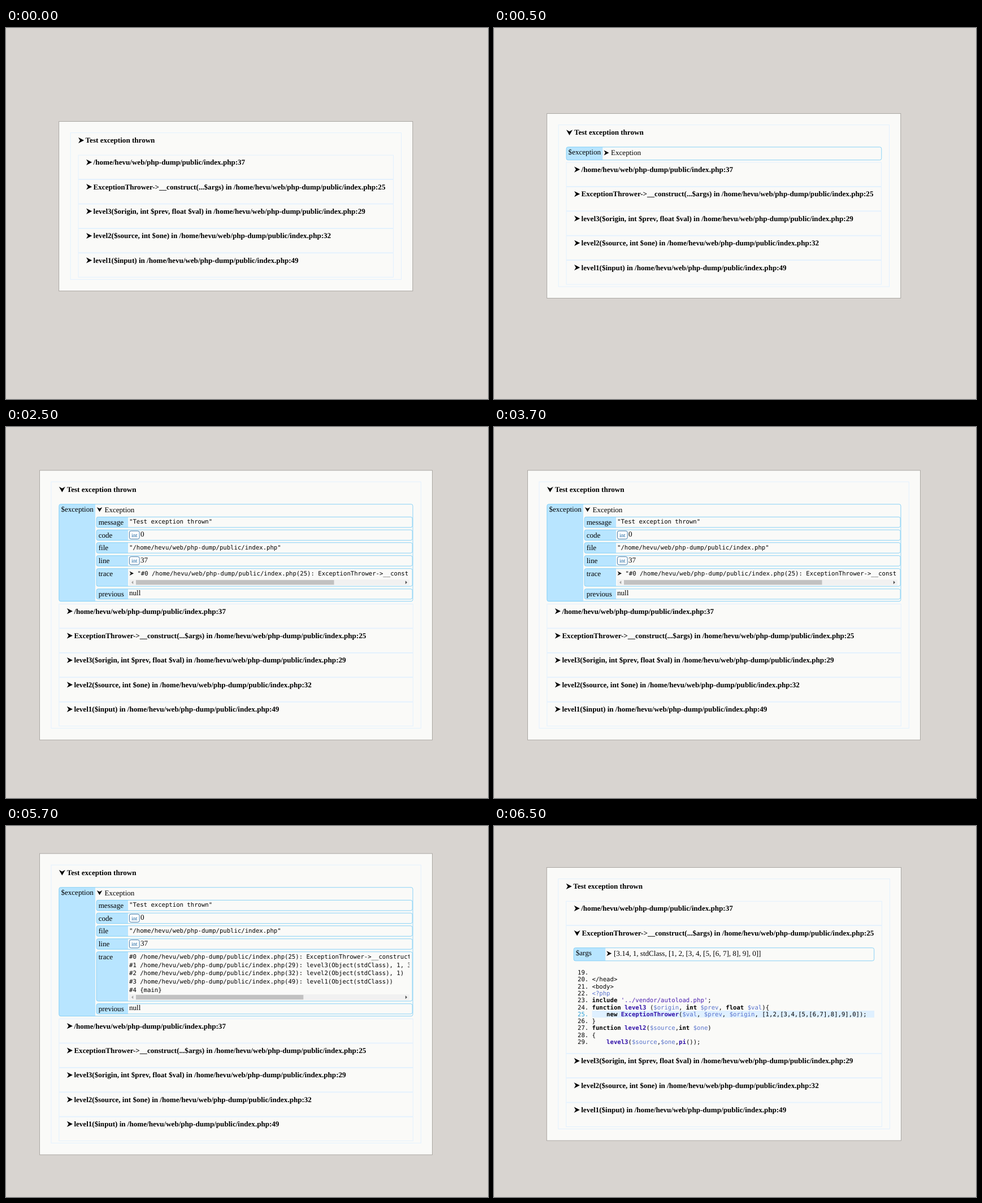
Animation of 853 by 657 pixels, one loop 8000 ms. Source, as an HTML page:

```html
<!DOCTYPE html>
<html lang="en">
<head>
<meta charset="utf-8">
<title>Exception dump</title>
<style>
  html, body { margin: 0; width: 100%; height: 100%; overflow: hidden; background: #d8d4d0; }
  svg { display: block; width: 853px; height: 657px; }
  text { white-space: pre; text-rendering: geometricPrecision; font: 13.09px "Liberation Serif", Times, serif; }
  .b { font-weight: bold; }
  .m { font: 10.636px "DejaVu Sans Mono", monospace; }
  .s { font-size: 9.82px; fill: #0b5a9a; }
  .k { font-weight: bold; }
  .f { font-weight: bold; fill: #3010a8; }
  .v { fill: #5872cc; }
  .q { fill: #4a1fb0; }
  .n { fill: #2a9fd6; }
</style>
</head>
<body>
<svg id="stage" viewBox="0 0 853 657"></svg>
<script>
const PALE = '#e0f0ff', SKY = '#7dcdf5', LABEL = '#b8e5ff', PAPER = '#fafaf8';
const PITCH = 43.4, LINE = 14.73, CODE_LINE = 12.28;
const PATH = '/home/hevu/web/php-dump/public/index.php';
const CALLS = [
  `${PATH}:37`,
  `ExceptionThrower->__construct(...$args) in ${PATH}:25`,
  `level3($origin, int $prev, float $val) in ${PATH}:29`,
  `level2($source, int $one) in ${PATH}:32`,
  `level1($input) in ${PATH}:49`
];
const TRACE = [
  `#0 ${PATH}(25): ExceptionThrower->__construct(3.14, 1, Object(stdClass))`,
  `#1 ${PATH}(29): level3(Object(stdClass), 1, 3.14)`,
  `#2 ${PATH}(32): level2(Object(stdClass), 1)`,
  `#3 ${PATH}(49): level1(Object(stdClass))`,
  '#4 {main}'
];
// Markup: {class|text}
const CODE = [
  '', '</head>', '<body>', '{v|<?php}',
  "{k|include} {q|'../vendor/autoload.php'};",
  '{k|function} {f|level3} ({v|$origin}, {k|int} {v|$prev}, {k|float} {v|$val}){',
  '    {k|new} {f|ExceptionThrower}({v|$val}, {v|$prev}, {v|$origin}, [1,2,[3,4,[5,[6,7],8],9],0]);',
  '}',
  '{k|function} {f|level2}({v|$source},{k|int} {v|$one})',
  '{',
  '    {f|level3}({v|$source},{v|$one},{f|pi}());'
];

const esc = s => s.replace(/&/g, '&amp;').replace(/</g, '&lt;').replace(/>/g, '&gt;');
const tag = (x, y, body, cls = '') => `<text x="${x}" y="${y}" class="${cls}">${body}</text>`;
const text = (x, y, s, cls) => tag(x, y, esc(s), cls);
const fill = (x, y, r, b, color) =>
  `<rect x="${x}" y="${y}" width="${r - x}" height="${b - y}" fill="${color}"/>`;
const box = (x, y, r, b, color, rx = 0, paint = 'none') =>
  `<rect x="${x + .45}" y="${y + .45}" width="${r - x - .9}" height="${b - y - .9}" rx="${rx}" fill="${paint}" stroke="${color}" stroke-width=".9"/>`;
const poly = (points, color = '#000') => `<polygon points="${points}" fill="${color}"/>`;

// Arrowhead centred vertically on cy, its left edge at x
function arrow(x, cy, open, size = 10.2) {
  const h = size / 2, n = size * .3;
  return open
    ? poly(`${x},${cy - h * .9} ${x + h * 1.08},${cy - h * .9 + n} ${x + h * 2.16},${cy - h * .9} ${x + h * 1.08},${cy + h}`)
    : poly(`${x},${cy - h} ${x + size},${cy} ${x},${cy + h} ${x + n},${cy}`);
}

function title(x, y, s, open) {
  return arrow(x, y - 4.3, open) + text(x + (open ? 13.9 : 12.6), y, s, 'b');
}

function labelled(x, y, r, b, split, name, base) {
  const d = 3;
  return `<path d="M${split},${y + .4}H${x + d}q${-d + .4},0 ${-d + .4},${d}V${b - d}q0,${d - .4} ${d - .4},${d - .4}H${split}z" fill="${LABEL}"/>`
    + box(x, y, r, b, SKY, d) + text(x + 4, base, name);
}

function intValue(y, s) {
  return `<rect x="218.4" y="${y + 2.4}" width="17.7" height="14.2" rx="2.8" fill="#fff" stroke="#2d6a9f" stroke-width=".9"/>`
    + text(222.1, y + 12.8, 'int', 's') + text(238, y + 12.3, s);
}

function scrollbar(y, end) {
  const c = y + 5;
  return fill(218, y, 714, y + 10, '#f1f1f1') + fill(230, y + .9, end, y + 9.1, '#c1c1c1')
    + poly(`222,${c} 225.2,${c - 3} 225.2,${c + 3}`, '#a3a3a3')
    + poly(`710,${c} 706.8,${c - 3} 706.8,${c + 3}`, '#505050');
}

function exceptionTable(y, traceOpen) {
  const grow = traceOpen ? 56 : 0, h = 172.8 + grow;
  const row = (top, height, name) =>
    labelled(159.7, y + top, 719.6, y + top + height, 216, name, y + top + 14.1);
  let s = labelled(93.4, y, 720.4, y + h, 158, '$exception', y + 13.6)
    + arrow(160.8, y + 9.6, true, 8.8) + text(174.4, y + 14.2, 'Exception');
  s += row(22.6, 19.4, 'message') + text(218, y + 34.9, '"Test exception thrown"', 'm')
    + row(45.4, 19.4, 'code') + intValue(y + 45.4, '0')
    + row(68, 19.4, 'file') + text(218, y + 80.6, `"${PATH}"`, 'm')
    + row(91, 19.4, 'line') + intValue(y + 91, '37')
    + row(114, 32.2 + grow, 'trace') + row(150 + grow, 19, 'previous')
    + text(218, y + 161.8 + grow, 'null');
  s += '<clipPath id="pane"><rect x="216" y="0" width="498" height="657"/></clipPath><g clip-path="url(#pane)">';
  if (traceOpen) TRACE.forEach((line, i) => s += text(218, y + 126.7 + i * LINE, line, 'm'));
  else s += arrow(218.6, y + 122.9, false, 7.4) + text(232.4, y + 126.7, '"' + TRACE[0], 'm');
  return s + '</g>' + scrollbar(y + 133.9 + grow, traceOpen ? 526.3 : 580.5);
}

const exceptionLine = y => labelled(127.6, y, 686.2, y + 23.8, 192.3, '$exception', y + 13.8)
  + arrow(194.4, y + 10.6, false, 9) + text(207, y + 14.5, 'Exception');

function callDetail() {
  let s = labelled(140.7, 215.3, 673.1, 239.2, 197.2, '$args', 229.4)
    + arrow(199.2, 225.8, false, 9)
    + text(212, 230, '[3.14, 1, stdClass, [1, 2, [3, 4, [5, [6, 7], 8], 9], 0]]')
    + fill(173.5, 327, 673, 339.3, '#dff0ff');
  CODE.forEach((line, i) => {
    const y = 263.1 + i * CODE_LINE, num = 19 + i;
    const body = esc(line).replace(/\{(\w)\|([^}]*)\}/g, '<tspan class="$1">$2</tspan>');
    s += text(148, y, num + '.', num === 25 ? 'm n' : 'm') + tag(173.5, y, body, 'm');
  });
  return s;
}

const SCENES = [
  { at: 0, left: 93.2, right: 720.2, top: 165, rows: 224.7 },
  { at: 500, left: 93.2, right: 720.2, top: 151, rows: 237.5, open: true, extra: () => exceptionLine(210.4) },
  { at: 2500, left: 59, right: 754.9, top: 76.4, rows: 313.1, open: true, extra: () => exceptionTable(136.3, false) },
  { at: 4500, left: 59, right: 754.9, top: 48.4, rows: 341.1, open: true, extra: () => exceptionTable(108.3, true) },
  { at: 6500, left: 92.8, right: 721, top: 73, rows: 132.8, openRow: 1, extra: callDetail }
];

function draw({ left, right, top, rows, open, openRow, extra }) {
  let y = rows, body = '';
  CALLS.forEach((call, i) => {
    const h = i === openRow ? 226.6 : PITCH;
    body += box(left + 34.4, y, right - 34.2, y + h, PALE)
      + title(left + 48.8, y + 17.4, call, i === openRow);
    y += h;
  });
  return box(left, top, right, y + 24.5, '#a5a19d', 0, PAPER)
    + box(left + 20.5, top + 20.2, right - 20.2, y + 4, PALE)
    + title(left + 34.8, top + 38.2, 'Test exception thrown', open)
    + body + (extra ? extra() : '');
}

const stage = document.getElementById('stage');
let shown = null;
function render(ms) {
  const scene = SCENES.filter(s => s.at <= ms).pop();
  if (scene === shown) return;
  shown = scene;
  stage.innerHTML = draw(scene);
}

const start = performance.now();
function tick() {
  render((performance.now() - start) % 8000);
  requestAnimationFrame(tick);
}
tick();
</script>
</body>
</html>
```
